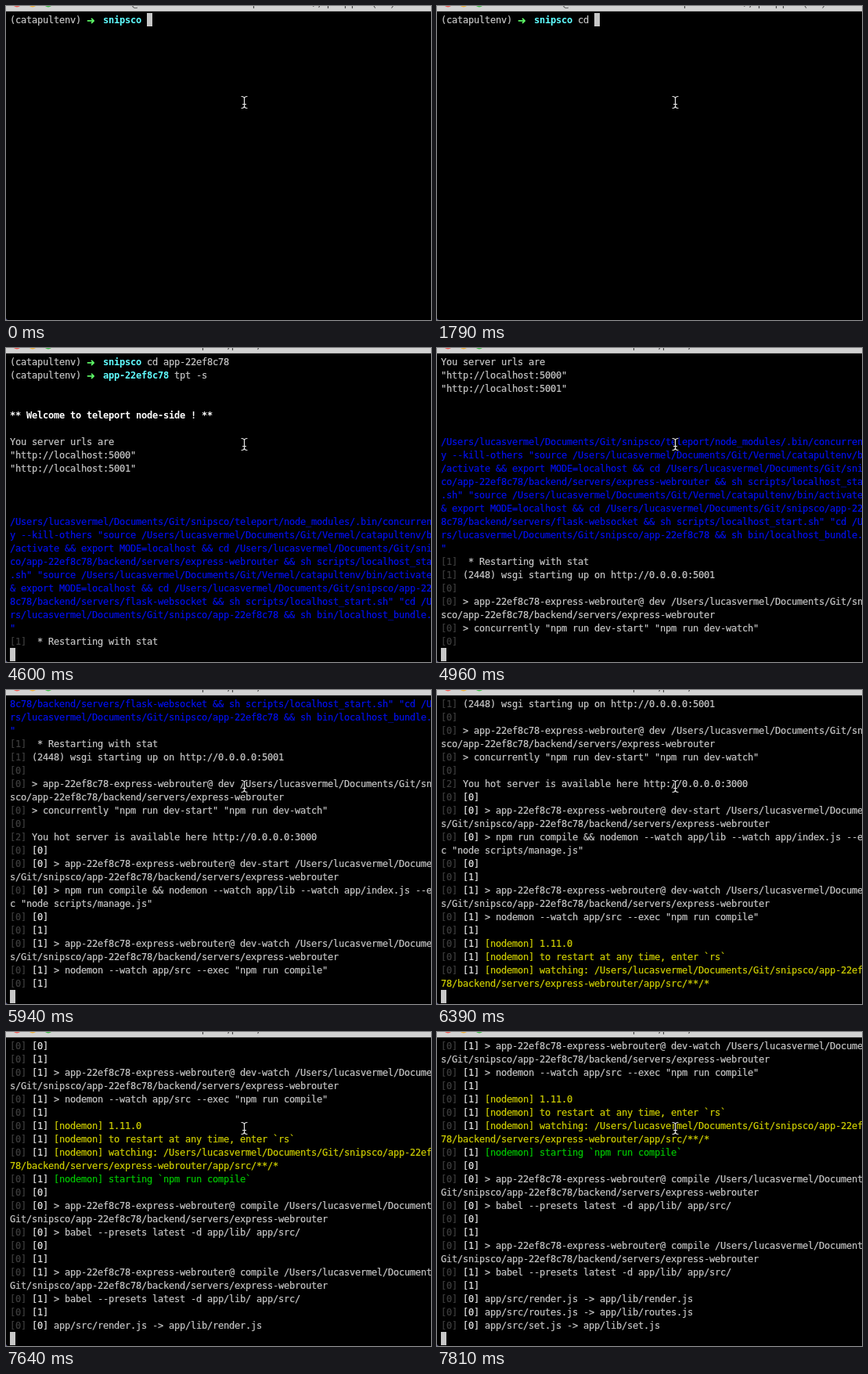
Write an HTML page that moves like this. It is 543x401 px and loops after 8000 ms.

```html
<!DOCTYPE html>
<html lang="en">
<head>
<meta charset="utf-8">
<title>Terminal</title>
<style>
html, body { margin: 0; width: 100%; height: 100%; overflow: hidden; background: #000; }
#stage { position: relative; width: 543px; height: 401px; overflow: hidden; background: #000; }
#screen {
  position: absolute; left: 5px; top: 10px;
  font: 12px/17px "DejaVu Sans Mono", monospace;
  letter-spacing: calc(7px - 1ch);
  -webkit-text-stroke: .2px;
  color: #c7c7c7; white-space: pre;
}
#screen div { height: 17px; }
#caret { position: absolute; width: 7px; height: 17px; background: #c7c7c7; }
svg { position: absolute; left: 0; top: 0; }
.d { color: #3e3e3e; }
.i { color: #e6e6e6; }
.b { color: #0010ee; }
.y { color: #d0d000; }
.g { color: #00c800; }
.c { color: #60fdff; font-weight: bold; -webkit-text-stroke: 0; }
.w { color: #fff; font-weight: bold; -webkit-text-stroke: 0; }
.a { color: #5ffa68; display: inline-block; width: 7px; height: 17px; vertical-align: top;
     font: bold 13px/17px "DejaVu Sans", sans-serif; letter-spacing: 0; }
</style>
</head>
<body>
<div id="stage">
  <div id="screen"></div>
  <div id="caret"></div>
  <svg width="543" height="401">
    <rect width="543" height="7" fill="#b4b4b4"/>
    <rect width="543" height="6" fill="#d2d2d2"/>
    <circle cx="14" cy="-4.5" r="6" fill="#f25a52"/>
    <circle cx="34" cy="-4.5" r="6" fill="#f0b23a"/>
    <circle cx="54" cy="-4.5" r="6" fill="#3fc048"/>
    <text id="title" y="0" font-family="Roboto, sans-serif" font-size="13" fill="#444"></text>
    <path d="M0 399v2h2z" fill="#4a4a78"/>
    <defs>
      <path id="beam" fill="none" stroke-linecap="round"
        d="M301 115.5q3.5 0 3.5 3v9q0 3-3.5 3M308 115.5q-3.5 0-3.5 3v9q0 3 3.5 3M302.5 125.5h4"/>
    </defs>
    <use href="#beam" stroke="#000" stroke-width="3"/>
    <use href="#beam" stroke="#e8e8e8" stroke-width="1.2"/>
  </svg>
</div>
<script>
const LOOP = 8000, COLS = 79, ROWS = 23, CELL_W = 7, CELL_H = 17;
const $ = id => document.getElementById(id);

const docs = '/Users/lucasvermel/Documents/Git/';
const app = 'app-22ef8c78';
const root = docs + 'snipsco/' + app;
const web = root + '/backend/servers/express-webrouter';
const env = '"source ' + docs + 'Vermel/catapultenv/bin/activate && export MODE=localhost && cd ';

const prompt = dir => '(catapultenv) {a➜}  {c' + dir + '} ';
const out = (n, text = '') => '{d[' + n + ']} ' + text + '\n';
const sub = (n, text = '') => out(0, '{i[' + n + ']} ' + text);
const run = (n, task) => sub(n, '> ' + app + '-express-webrouter@ ' + task + ' ' + web);
const mon = (color, text) => sub(1, '{' + color + '[nodemon] ' + text + '}');
const babel = '> babel --presets latest -d app/lib/ app/src/';
const built = name => sub(0, `app/src/${name}.js -> app/lib/${name}.js`);

const launch = '{b' + docs + 'snipsco/teleport/node_modules/.bin/concurrently --kill-others ' +
  env + web + ' && sh scripts/localhost_start.sh" ' +
  env + root + '/backend/servers/flask-websocket && sh scripts/localhost_start.sh" ' +
  '"cd ' + root + ' && sh bin/localhost_bundle.sh"}\n';

// [ms, printed text]; {x...} colours a run, \b erases one cell
const steps = [
  [0, prompt('snipsco')],
  [1440, 'c'], [1620, 'd'], [1790, ' '], [1860, 'a'], [1930, 'p'],
  [2110, 'p-22ef8c78/'],
  [2370, '\b\n'],
  [2460, prompt(app)],
  [2730, 't'], [2910, 'pt'], [3090, ' '], [3450, '-'], [3540, 's'],
  [3620, '\n'],
  [3980, '\n\n{w** Welcome to teleport node-side ! **}\n\nYou server urls are\n' +
    '"http://localhost:5000"\n"http://localhost:5001"\n\n'],
  [4070, '\n\n' + launch],
  [4520, out(1, ' * Restarting with stat')],
  [4780, out(1, '(2448) wsgi starting up on http://0.0.0.0:5001')],
  [4960, out(0) + out(0, '> ' + app + '-express-webrouter@ dev ' + web) +
    out(0, '> concurrently "npm run dev-start" "npm run dev-watch"') + out(0)],
  [5230, out(2, 'You hot server is available here http://0.0.0.0:3000')],
  [5940, sub(0) + run(0, 'dev-start') +
    sub(0, '> npm run compile && nodemon --watch app/lib --watch app/index.js --exec "node scripts/manage.js"') +
    sub(0) + sub(1) + run(1, 'dev-watch') +
    sub(1, '> nodemon --watch app/src --exec "npm run compile"') + sub(1)],
  [6390, mon('y', '1.11.0') + mon('y', 'to restart at any time, enter `rs`') +
    mon('y', 'watching: ' + root + '/backend/servers/express-webrouter/app/src/**/*')],
  [6480, mon('g', 'starting `npm run compile`')],
  [6660, sub(0) + run(0, 'compile') + sub(0, babel) + sub(0)],
  [7190, sub(1) + run(1, 'compile') + sub(1, babel) + sub(1)],
  [7640, built('render')], [7730, built('routes')], [7810, built('set')]
];

// Only the descenders of the window title reach into view
const titles = [
  [0, '@p/,ppp()', '160 315 392 399 410 432 441 468 492'],
  [2460, '@,pppp/pp,,', '160 310 378 402 411 425 453 462 469 516 538'],
  [3710, 'p,p,', '250 283 288 321']
];

function layout(text) {
  const rows = [[]];
  let color = '';
  for (let i = 0; i < text.length; i++) {
    const ch = text[i];
    let row = rows[rows.length - 1];
    if (ch === '{') color = text[++i];
    else if (ch === '}') color = '';
    else if (ch === '\b') row.pop();
    else if (ch === '\n') rows.push([]);
    else {
      if (row.length === COLS) rows.push(row = []);
      row.push([ch, color]);
    }
  }
  return rows;
}

function rowNode(cells) {
  const div = document.createElement('div');
  let span, last;
  for (const [ch, color] of cells) {
    if (!span || color !== last) {
      span = div.appendChild(document.createElement('span'));
      span.className = last = color;
    }
    span.textContent += ch;
  }
  return div;
}

function draw(n) {
  const text = steps.slice(0, n + 1).map(s => s[1]).join('');
  const rows = layout(text).slice(-ROWS);
  $('screen').replaceChildren(...rows.map(rowNode));
  $('caret').style.left = 5 + rows[rows.length - 1].length * CELL_W + 'px';
  $('caret').style.top = 9 + (rows.length - 1) * CELL_H + 'px';
}

const at = (list, t) => list.findLastIndex(s => s[0] <= t);
const start = performance.now();
let shown = -1, titled = -1;

function tick() {
  const t = (performance.now() - start) % LOOP;
  const n = at(steps, t), k = at(titles, t);
  if (n !== shown) draw(shown = n);
  if (k !== titled) {
    const [, glyphs, xs] = titles[titled = k];
    $('title').textContent = glyphs;
    $('title').setAttribute('x', xs);
  }
  requestAnimationFrame(tick);
}
tick();
</script>
</body>
</html>
```
